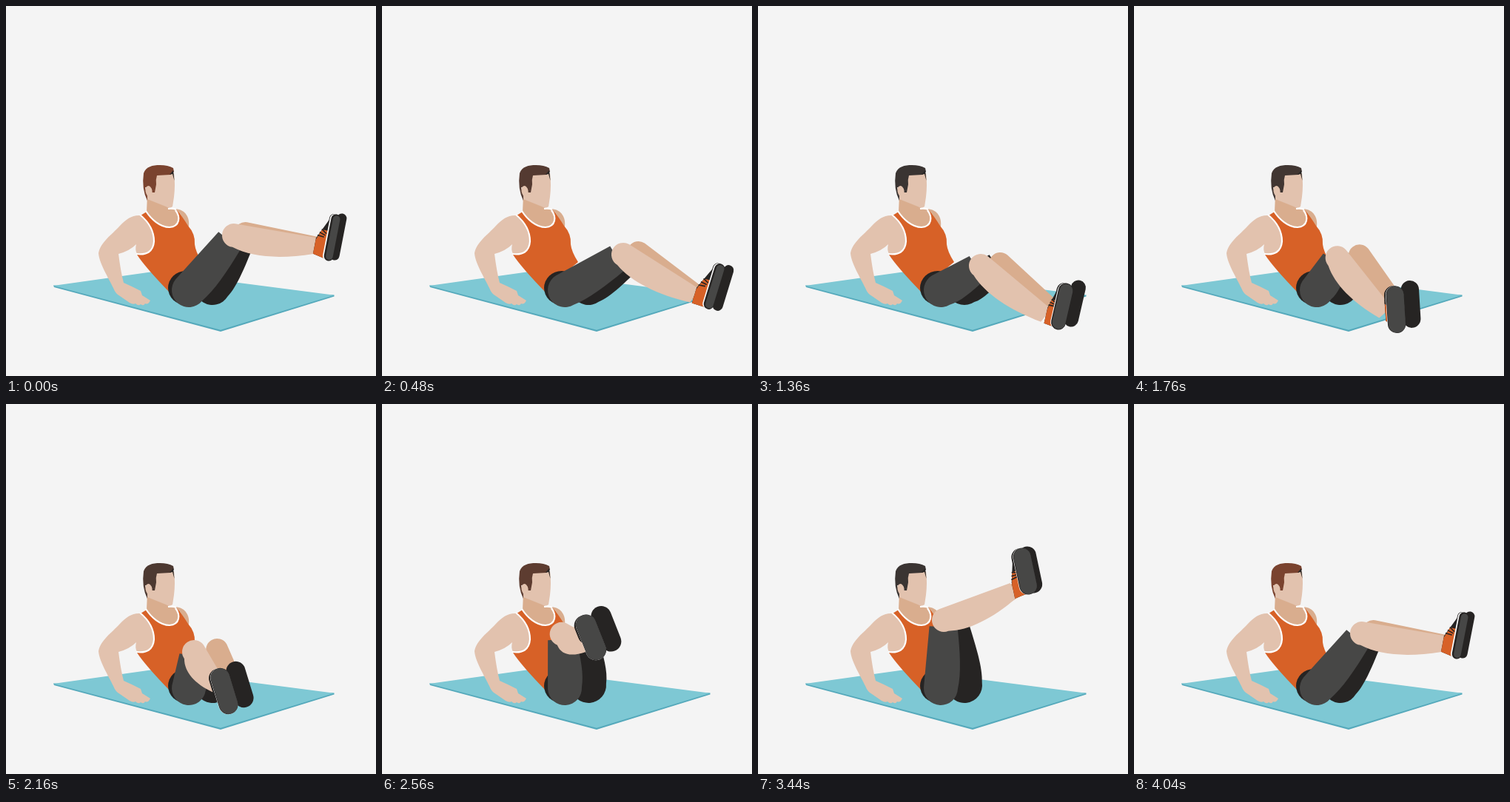
Animation of 500 by 500 pixels, one loop 4.08 s. Source, as an HTML page with a canvas:

```html
<!DOCTYPE html>
<html lang="en">
<head>
<meta charset="utf-8">
<title>Leg circles</title>
<style>
html, body { margin: 0; width: 100%; height: 100%; overflow: hidden; background: #f4f4f4; }
canvas { display: block; }
</style>
</head>
<body>
<canvas id="stage" width="500" height="500"></canvas>
<script>
const ctx = document.getElementById('stage').getContext('2d');
const LOOP = 4080, CYCLE = 4040, STEP = 40;
const SKIN = '#e2c2ae', TAN = '#d9ad8e', ORANGE = '#d76127';
const GREY = '#474746', DARK = '#262423', WHITE = '#fff';
const HIP = [247, 384], FAR_HIP = [279, 380], SHOE_LENGTH = 64;

// Key points of the near leg. gap leads to the far foot, tilt is in degrees.
const poses = [
  { time: 0, knee: [308, 310], ankle: [417, 324], sole: [441, 313], gap: [8, -1], tilt: [11], width: [13], hair: [1] },
  { time: 480, knee: [326, 336], ankle: [422, 391], sole: [449, 379], gap: [12, 2], tilt: [17], width: [14], hair: [0.4] },
  { time: 1360, knee: [301, 351], ankle: [389, 418], sole: [411, 406], gap: [17, -4], tilt: [13], width: [20], hair: [0] },
  { time: 1720, knee: [277, 341], ankle: [345, 416], sole: [360, 411], gap: [20, -7], tilt: [-2], width: [24], hair: [0.1] },
  { time: 2160, knee: [254, 335], ankle: [288, 383], sole: [295, 388], gap: [21, -9], tilt: [-17], width: [26], hair: [0.3] },
  { time: 2920, knee: [238, 291], ankle: [287, 276], sole: [291, 252], gap: [18, -12], tilt: [-22], width: [28], hair: [0.65] },
  { time: 3440, knee: [251, 292], ankle: [345, 252], sole: [361, 226], gap: [7, -2], tilt: [-12], width: [24], hair: [0] }
];

const mix = (a, b, k) => a.map((v, i) => v + (b[i] - v) * k);
const move = (p, dir, d) => [p[0] + dir[0] * d, p[1] + dir[1] * d];
const add = (p, q) => move(p, q, 1);

// Cyclic access: the time keeps growing past the end of the list.
function poseAt(i) {
  const n = poses.length, turn = Math.floor(i / n), pose = poses[i - turn * n];
  return { ...pose, time: pose.time + turn * CYCLE };
}

// Hermite blend of all values through the neighbouring poses.
function blend(t) {
  let i = poses.length - 1;
  while (poses[i].time > t) i--;
  const [p, a, b, q] = [-1, 0, 1, 2].map(k => poseAt(i + k));
  const span = b.time - a.time, u = (t - a.time) / span;
  const ease = u * u * (3 - 2 * u);
  const lead = u * (1 - u) ** 2 * span / (b.time - p.time);
  const trail = u * u * (u - 1) * span / (q.time - a.time);
  const out = {};
  for (const key in a) {
    if (key === 'time') continue;
    out[key] = a[key].map((v, j) => v + (b[key][j] - v) * ease
      + (b[key][j] - p[key][j]) * lead + (q[key][j] - v) * trail);
  }
  return out;
}

// Tapered limb: round at a, cut straight at b, with a muscle on its underside.
function limb(a, b, ra, rb, bulge, color) {
  const angle = Math.atan2(b[1] - a[1], b[0] - a[0]);
  const under = [-Math.sin(angle), Math.cos(angle)];
  ctx.beginPath();
  ctx.arc(...a, ra, angle + Math.PI / 2, angle - Math.PI / 2);
  ctx.lineTo(...move(b, under, -rb));
  ctx.lineTo(...move(b, under, rb));
  ctx.bezierCurveTo(...move(mix(b, a, 0.4), under, rb + bulge),
    ...move(mix(b, a, 0.75), under, ra + bulge * 0.8), ...move(a, under, ra));
  ctx.fillStyle = color;
  ctx.fill();
}

function poly(pts, color) {
  ctx.beginPath();
  pts.forEach(p => ctx.lineTo(...p));
  ctx.fillStyle = color;
  ctx.fill();
}

function ellipse(x, y, rx, ry, tilt, color) {
  ctx.beginPath();
  ctx.ellipse(x, y, rx, ry, tilt, 0, Math.PI * 2);
  ctx.fillStyle = color;
  ctx.fill();
}

function line(a, b, width, color) {
  ctx.beginPath();
  ctx.moveTo(...a);
  ctx.lineTo(...b);
  ctx.lineCap = 'round';
  ctx.lineWidth = width;
  ctx.strokeStyle = color;
  ctx.stroke();
}

function shape(d, color) {
  ctx.fillStyle = color;
  ctx.fill(new Path2D(d));
}

function trim(d) {
  ctx.lineWidth = 2.2;
  ctx.lineCap = 'butt';
  ctx.strokeStyle = WHITE;
  ctx.stroke(new Path2D(d));
}

function drawMat() {
  poly([[64, 377.5], [65, 380], [290, 440], [443.5, 392.5], [443.5, 390.5]], '#55a9bb');
  poly([[64, 378], [199, 359], [443.5, 390.7], [290, 437.7]], '#7ec8d4');
}

function drawBody(warmth) {
  const hair = mix([58, 52, 50], [122, 67, 47], warmth).map(Math.round);
  shape('M219 275C236 271 249 280 247 298L228 300Z', TAN);
  shape('M191 255L190 278C198 292 213 300 224 299C234 297 235 286 229 277L219 272V255Z', TAN);
  shape('M182 283L190 278C198 291 209 299 222 299C234 298 236 286 231 276Q238 284 246 297'
    + 'Q256 308 255 322Q256 332 265 346L248 360L222 388Q188 353 177 336Q201 310 182 283Z', ORANGE);
  shape('M182 283C171 282 163 287 153 298C143 309 128 319 125 334C126 348 139 368 145 381'
    + 'Q148 389 154 392L167 401Q172 404 175 402Q179 406 182 403Q186 406 188 402Q192 404 195 398'
    + 'L184 391L182 385L170 379L159 374Q155 359 152 335Q167 331 176 322Q174 329 177 335'
    + 'C190 338 199 331 200 319C200 305 192 293 182 283Z', SKIN);
  trim('M181 282C193 292 200 305 200 318C199 332 190 337 176 335');
  trim('M189 277C196 288 208 299 221 299C235 298 236 285 229 276');
  trim('M219 274Q225 273 230 275');
  shape('M200 226H227Q229 241 227 258L225 271Q221 274 216 271L191 261L190 243Z', SKIN);
  shape('M191 263Q183 247 186 226C189 217 198 215 208 215Q219 215 226 219L227 224L222 228'
    + 'L204 229Q202 235 203 241L201 252H197L196 246L188 245L191 257Z', `rgb(${hair})`);
  shape('M221 228L226 222L227.5 236L225 227Z', DARK);
  ellipse(193, 250, 4.5, 7, -0.2, SKIN);
}

function drawShoe(ankle, toe, heel, along, width) {
  const left = [along[1], -along[0]];
  const edge = (30 - width) * 0.1;
  const collar = move(ankle, along, 11), back = move(ankle, along, -11);
  const tip = move(toe, left, width / 2 + 1), middle = mix(toe, heel, 0.35);
  const instep = mix(collar, tip, 0.42);
  const base = move(heel, along, -width * 0.4);
  line(move(toe, left, 2.5), move(middle, left, 2.5), width, DARK);
  poly([collar, tip, toe, base, back], DARK);
  poly([mix(collar, back, 0.12), instep, middle, base, back], ORANGE);
  for (const k of [0.3, 0.65, 1]) {
    const eyelet = mix(collar, instep, k);
    line(eyelet, mix(eyelet, mix(middle, heel, 0.3), 0.4), 1.6, DARK);
  }
  line(move(toe, left, edge), move(heel, left, edge), width, WHITE);
  line(toe, heel, width, DARK);
  line(move(toe, left, -edge / 2), move(heel, left, -edge / 2), width - edge * 2, GREY);
}

function drawLegs({ knee, ankle, sole, gap, tilt, width }) {
  const [w] = width, angle = tilt[0] * Math.PI / 180;
  const along = [Math.sin(angle), -Math.cos(angle)];
  const half = (SHOE_LENGTH - w) / 2;
  const toe = move(sole, along, half), heel = move(sole, along, -half);
  const farKnee = add(knee, [6 + gap[0] * 1.2, -3]);

  limb(FAR_HIP, mix(FAR_HIP, farKnee, 0.9), 24, 18, 5, DARK);
  limb(farKnee, add(ankle, gap), 15, 10, 4, TAN);
  line(add(toe, gap), add(heel, gap), w, DARK);
  ellipse(243, 381, 24, 23, 0, DARK);
  limb(HIP, mix(HIP, knee, 0.9), 23, 19, 5, GREY);
  limb(knee, ankle, 16, 11, 13, SKIN);
  drawShoe(ankle, toe, heel, along, w);
}

const start = performance.now();

function frame() {
  const elapsed = (performance.now() - start) % LOOP;
  const pose = blend(Math.floor(elapsed / STEP) * STEP % CYCLE);
  ctx.fillStyle = '#f4f4f4';
  ctx.fillRect(0, 0, 500, 500);
  drawMat();
  drawBody(pose.hair[0]);
  drawLegs(pose);
  requestAnimationFrame(frame);
}
frame();
</script>
</body>
</html>
```
